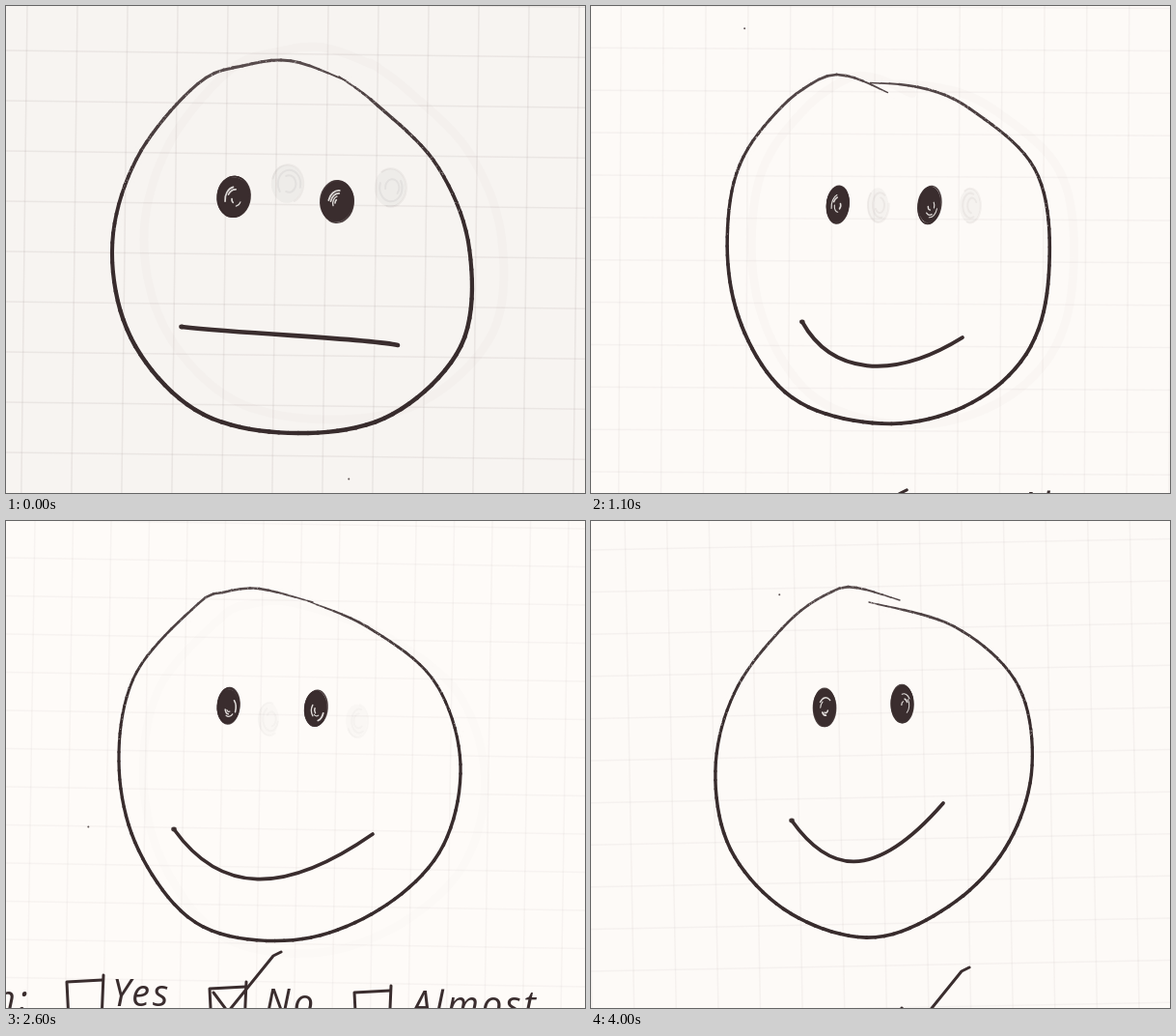
An HTML page with a canvas that plays this animation: 600 by 504 pixels, repeating every 4.1 s.

```html
<!DOCTYPE html>
<html lang="en">
<head>
<meta charset="utf-8">
<title>Pencil face</title>
<style>
html, body { margin: 0; width: 100%; height: 100%; overflow: hidden; background: #fdfaf7; }
canvas { display: block; width: 600px; height: 504px; }
</style>
</head>
<body>
<canvas id="stage" width="600" height="504"></canvas>
<script>
const W = 600, H = 504, STEP = 100, LOOP = 4100, TAU = Math.PI * 2, RAD = Math.PI / 180;
const ctx = document.getElementById('stage').getContext('2d');
const keys = [];
const ink = a => `rgba(58,45,46,${a})`;
const tone = (p, a = 1) => `rgba(${Math.round(p)},${Math.round(p - 3)},${Math.round(p - 6)},${a})`;

function random(seed) {
  let s = seed * 7919 + 17;
  return () => {
    s = (s + 0x6D2B79F5) | 0;
    let v = Math.imul(s ^ (s >>> 15), 1 | s);
    v = (v + Math.imul(v ^ (v >>> 7), 61 | v)) ^ v;
    return ((v ^ (v >>> 14)) >>> 0) / 4294967296;
  };
}

function mix(a, b, k) {
  return Array.isArray(a) ? a.map((v, i) => mix(v, b[i], k)) : a + (b - a) * k;
}

function pairs(flat) {
  const out = [];
  for (let i = 0; i < flat.length; i += 2) out.push([flat[i], flat[i + 1]]);
  return out;
}

// Catmull-Rom curve cut into equal lengths
function spline(p, count) {
  const fine = [p[0]], len = [0];
  for (let i = 0; i < p.length - 1; i++) {
    const a = p[i - 1] || p[i], b = p[i], c = p[i + 1], d = p[i + 2] || c;
    for (let t = 1 / 12; t < 1.01; t += 1 / 12) {
      fine.push([0, 1].map(n => b[n] + t / 2 * (c[n] - a[n] +
        t * (2 * a[n] - 5 * b[n] + 4 * c[n] - d[n] + t * (3 * (b[n] - c[n]) + d[n] - a[n])))));
    }
  }
  for (let i = 1; i < fine.length; i++) {
    len.push(len[i - 1] + Math.hypot(fine[i][0] - fine[i - 1][0], fine[i][1] - fine[i - 1][1]));
  }
  const total = len[len.length - 1];
  return Array.from({ length: count }, (_, i) => {
    const at = total * i / (count - 1);
    let j = 1;
    while (j < fine.length - 1 && len[j] < at) j++;
    return mix(fine[j - 1], fine[j], (at - len[j - 1]) / (len[j] - len[j - 1] || 1));
  });
}

// Outline: pen enters, goes round by radii 30 degrees apart, then leaves
function outline([cx, cy], enter, radii, leave) {
  const round = radii.map((r, i) => {
    const a = (i * 30 - 60) * RAD;
    return [cx + r * Math.cos(a), cy + r * Math.sin(a)];
  });
  return spline([...pairs(enter), ...round, ...pairs(leave)], 120);
}

// mouth: Bezier points; eyes: x, y, x, y, rx, ry, tilt; rub: erased eyes dx, dy, strength
// grid: size, x, y, tilt; form: drop, last word dx, dy, tick x, y
function key(time, pose) {
  keys.push({ time, pose });
}

key(0, {
  face: outline([297, 250], [345, 73], [172, 172, 183, 202, 201, 192, 196, 192, 187, 186, 196], [250, 61, 297, 57, 352, 77]),
  mouth: [182, 332, 255, 340, 375, 344, 406, 351],
  eyes: [236, 198, 343, 202, 18, 22, 6], rub: [55, -14, .09],
  grid: [52, 22, 46, .7], paper: 247, pen: 4.4, form: [60, 0, 40, 300, 530]
});
key(800, {
  face: outline([316, 255], [300, 85, 358, 83], [175, 180, 170, 175, 168, 171, 179, 167, 168, 183, 188], [262, 81, 303, 85]),
  mouth: [218, 325, 250, 372, 320, 388, 387, 345],
  eyes: [260, 199, 360, 197, 13, 20, 5], rub: [33, 11, .06],
  grid: [44, 33, 43, .9], paper: 253, pen: 3.8, form: [60, 38, 0, 287, 500]
});
key(1500, {
  face: outline([303, 252], [283, 73, 322, 81], [163, 167, 170, 181, 189, 190, 187, 176, 172, 178, 184], [245, 71, 283, 62, 322, 97]),
  mouth: [222, 327, 248, 392, 300, 388, 382, 339],
  eyes: [246, 213, 339, 218, 12, 23, 6], rub: [54, -12, .11],
  grid: [43.7, 44, 30, -.5], paper: 253, pen: 3.9, form: [60, 0, 40, 381, 502]
});
key(2000, {
  face: outline([300, 265], [253, 93, 320, 77], [187, 170, 170, 179, 183, 182, 198, 178, 171, 170, 186], [235, 83, 262, 79, 313, 102, 267, 145]),
  mouth: [213, 344, 260, 372, 330, 390, 381, 347],
  eyes: [238, 219, 333, 215, 12, 22, 2], rub: [27, -43, .05],
  grid: [43.8, 18, 46, .95], paper: 254, pen: 3.8, form: [50, 0, 30, 330, 520]
});
key(2600, {
  face: outline([295, 252], [313, 83], [163, 172, 176, 179, 176, 182, 191, 181, 178, 186, 192], [225, 74, 262, 70, 318, 84]),
  mouth: [174, 319, 222, 386, 288, 388, 380, 324],
  eyes: [230, 192, 321, 194, 12, 19, 4], rub: [42, 13, .04],
  grid: [39.5, 30, 38, .9], paper: 254, pen: 3.5, form: [0, 0, 0, 285, 446]
});
key(3500, {
  face: outline([293, 260], [304, 73, 345, 69], [206, 203, 193, 169, 158, 182, 212, 207, 195, 198, 189], [260, 75, 300, 73, 349, 91]),
  mouth: [166, 299, 210, 378, 272, 390, 351, 293],
  eyes: [220, 185, 303, 188, 11, 17, 2], rub: [59, -5, .24],
  grid: [43.5, 48, 20, .7], paper: 253, pen: 3.9, form: [50, 0, 40, 340, 520]
});
key(4000, {
  face: outline([293, 255], [288, 84], [168, 172, 164, 160, 163, 176, 174, 171, 164, 164, 175], [250, 73, 275, 69, 320, 82]),
  mouth: [208, 310, 245, 362, 291, 377, 365, 292],
  eyes: [242, 193, 323, 189, 12, 20, 0], rub: [50, 0, 0],
  grid: [43.6, 35, 30, -1.1], paper: 253, pen: 3.6, form: [60, 0, 40, 392, 462]
});

// Small wobble that makes each in-between its own drawing
function redraw(pose, rnd) {
  const off = n => (rnd() - .5) * 2 * n;
  const dx = off(3), dy = off(3), amp = off(3), phase = rnd() * TAU;
  pose.face = pose.face.map(([x, y], i) => {
    const bend = amp * Math.sin(i / 40 * TAU + phase);
    return [x + dx + bend, y + dy + bend * .6];
  });
  for (const part of [pose.eyes, pose.mouth]) {
    for (let i = 0; i < part.length; i++) part[i] += off(1.5);
  }
  pose.grid[1] += off(12);
  pose.grid[2] += off(12);
}

function poseAt(frame) {
  const time = frame * STEP;
  const i = keys.findLastIndex(k => k.time <= time);
  const a = keys[i], b = keys[i + 1] || a;
  const k = (time - a.time) / (b.time - a.time || 1);
  const pose = {};
  for (const name in a.pose) pose[name] = mix(a.pose[name], b.pose[name], k);
  if (k) redraw(pose, random(frame));
  return pose;
}

function line(pts, width, color) {
  ctx.beginPath();
  pts.forEach(([x, y], i) => i ? ctx.lineTo(x, y) : ctx.moveTo(x, y));
  ctx.lineWidth = width;
  ctx.strokeStyle = color;
  ctx.stroke();
}

function oval(x, y, rx, ry, from = 0, to = TAU) {
  ctx.beginPath();
  ctx.ellipse(x, y, rx, ry, 0, from, to);
}

function drawPaper({ paper, grid: [size, x, y, tilt] }) {
  ctx.fillStyle = tone(paper);
  ctx.fillRect(0, 0, W, H);
  ctx.save();
  ctx.rotate(tilt * RAD);
  const color = `rgba(150,138,138,${.07 + (254 - paper) * .009})`;
  for (let i = -2; i < 18; i++) {
    line([[x + i * size, -20], [x + i * size, H + 20]], 1.5, color);
    line([[-20, y + i * size], [W + 20, y + i * size]], 1.5, color);
  }
  ctx.restore();
}

// Traces of an erased drawing, and a little dust
function drawTraces({ face, eyes, rub: [dx, dy, alpha] }, rnd) {
  line(face.map(([x, y]) => [x + dx * .6, y + dy]), 9, ink(Math.min(alpha * .2, .016)));
  const [, , , , rx, ry] = eyes;
  for (const i of [0, 2]) {
    const x = eyes[i] + dx, y = eyes[i + 1] + dy;
    oval(x, y, rx * .9, ry * .9);
    ctx.fillStyle = ink(alpha * .5);
    ctx.fill();
    for (let j = 0; j < 3; j++) {
      const from = rnd() * TAU;
      oval(x + rnd() * 3, y, rx * (.4 + j * .25), ry * (.4 + j * .25), from, from + 4);
      ctx.lineWidth = 2;
      ctx.strokeStyle = ink(alpha * .6);
      ctx.stroke();
    }
  }
  oval(rnd() * W, rnd() * H, 1, 1);
  ctx.fillStyle = ink(.8);
  ctx.fill();
}

function drawFace({ face, pen, paper }, rnd) {
  const n = face.length;
  for (let i = 1; i < n; i++) {
    const depth = Math.min(1, Math.max(0, (face[i][1] - 60) / 260));
    const end = Math.min(1, .4 + Math.min(i, n - i) / 9);
    const shade = Math.round(88 - 32 * Math.min(1, depth * 2));
    line([face[i - 1], face[i]], pen * (.7 + .3 * depth) * end, `rgb(${shade},${shade - 12},${shade - 11})`);
  }
  // Dry pen texture on the upper part
  ctx.fillStyle = tone(paper, .5);
  for (const [x, y] of face) {
    for (let j = 0; y < 230 && j < 5; j++) {
      ctx.fillRect(x + (rnd() - .5) * 12, y + (rnd() - .5) * 12, 1, 1);
    }
  }
}

function drawEyes({ eyes, paper }, rnd) {
  const [, , , , rx, ry, tilt] = eyes;
  for (const i of [0, 2]) {
    ctx.save();
    ctx.translate(eyes[i], eyes[i + 1]);
    ctx.rotate(tilt * RAD);
    oval(0, 0, rx * .94, ry * .94);
    ctx.fillStyle = ink(1);
    ctx.fill();
    // Loose pen loops round the rim, then gaps left inside
    for (let j = 0; j < 3; j++) {
      oval((rnd() - .5) * 2, (rnd() - .5) * 3, rx * .92, ry * .95);
      ctx.lineWidth = 1.5;
      ctx.strokeStyle = ink(.9);
      ctx.stroke();
    }
    for (let j = 0; j < 4; j++) {
      const size = .2 + j * .13, from = rnd() * TAU;
      oval(rx * .1, ry * .08, rx * size, ry * size, from, from + .7 + rnd());
      ctx.lineWidth = 1 + rnd() * .8;
      ctx.strokeStyle = tone(paper, .85);
      ctx.stroke();
    }
    ctx.restore();
  }
}

function drawMouth({ mouth: [x, y, ...rest], pen }) {
  ctx.beginPath();
  ctx.moveTo(x, y);
  ctx.bezierCurveTo(...rest);
  ctx.lineWidth = pen * 1.05;
  ctx.strokeStyle = ink(1);
  ctx.stroke();
  oval(x, y, 2.8, 2.4);
  ctx.fillStyle = ink(.9);
  ctx.fill();
}

function word(text, x, y) {
  ctx.fillStyle = ink(1);
  ctx.fillText(text, x, y);
}

function box(x, y) {
  line([[x + 2, y + 40], [x, y], [x + 37, y - 2]], 3, ink(1));
  line([[x + 38, y - 7], [x + 36, y + 40]], 3, ink(1));
}

function drawForm([drop, dx, dy, tx, ty]) {
  ctx.font = 'italic 38px "Open Sans", sans-serif';
  ctx.letterSpacing = '3px';
  word('n:', -12, 508 + drop);
  word('Yes', 110, 502 + drop);
  word('No', 268, 512 + drop);
  word('Almost', 420 + dx, 514 + dy);
  box(63, 477 + drop);
  box(211, 484 + drop);
  box(361, 488 + drop);
  line([[tx, ty], [tx - 8, ty + 4], [tx - 55, ty + 62], [tx - 70, ty + 42]], 3, ink(1));
}

function draw(frame) {
  const pose = poseAt(frame), rnd = random(frame + 100);
  ctx.lineCap = ctx.lineJoin = 'round';
  drawPaper(pose);
  drawTraces(pose, rnd);
  drawFace(pose, rnd);
  drawEyes(pose, rnd);
  drawMouth(pose);
  drawForm(pose.form);
}

const start = performance.now();
let shown = -1;
function tick() {
  const frame = Math.floor((performance.now() - start) % LOOP / STEP);
  if (frame !== shown) draw(shown = frame);
  requestAnimationFrame(tick);
}
tick();
</script>
</body>
</html>
```
